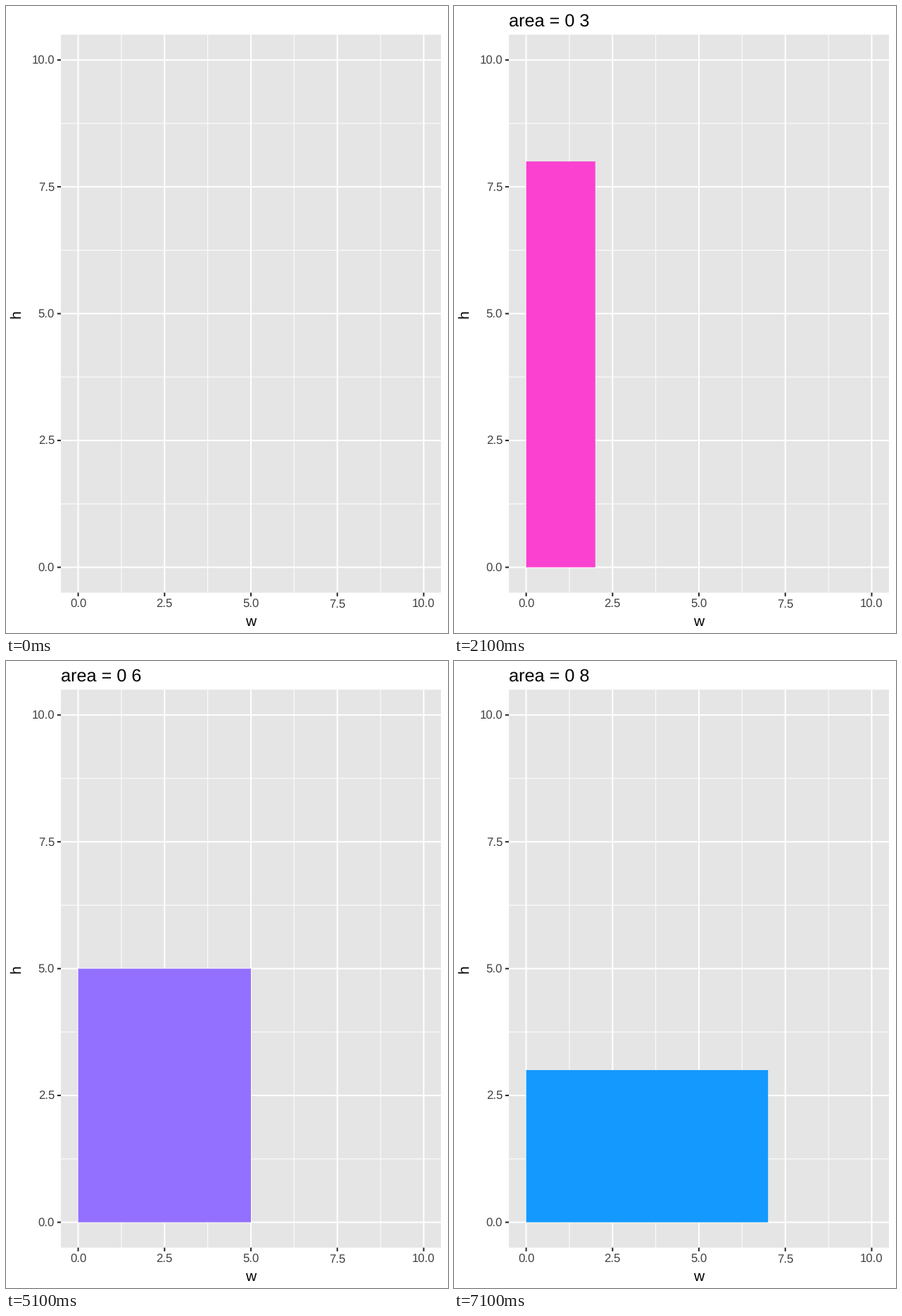
Animation, 628 px wide and 892 px high, one loop 8000 ms. Source, as a matplotlib script:

```python
import matplotlib.pyplot as plt
from matplotlib.animation import FuncAnimation
from matplotlib.patches import Rectangle

plt.rcParams["font.family"] = "Liberation Sans"
plt.rcParams["text.hinting"] = "none"

W, H, DPI = 628, 892, 100
LEFT, RIGHT, TOP, BOTTOM = 78, 618, 40.7, 834.6
PT = 72 / DPI  # points per pixel
STEP_MS, LOOP_MS, FIRST_MS = 100, 8000, 100

# Fill colour for each bar width from 0 to 7
FILLS = ["#ff5a90", "#ff48b0", "#fa41cf", "#e349ea",
         "#c457ff", "#9370ff", "#5086ff", "#1499ff"]


def px(w):
    return LEFT + (w + 0.5) * (RIGHT - LEFT) / 11


def py(h):
    return BOTTOM - (h + 0.5) * (BOTTOM - TOP) / 11


fig = plt.figure(figsize=(W / DPI, H / DPI), dpi=DPI, facecolor="white")
ax = fig.add_axes([0, 0, 1, 1])
ax.set_xlim(0, W)
ax.set_ylim(H, 0)
ax.axis("off")


def line(xs, ys, width, color, z):
    ax.plot(xs, ys, color=color, lw=width * PT, zorder=z,
            solid_capstyle="butt", snap=False)


def label(x, y, text, size, color="black", ha="center", **kw):
    return ax.text(x, y, text, fontsize=size * PT, color=color, ha=ha,
                   va="baseline", **kw)


def box(x, y, w, h, color, z):
    patch = Rectangle((x, y), w, h, fc=color, lw=0, zorder=z, snap=False)
    return ax.add_patch(patch)


def grid(v, width, z):
    line([px(v)] * 2, [TOP, BOTTOM], width, "white", z)
    line([LEFT, RIGHT], [py(v)] * 2, width, "white", z)


box(LEFT, TOP, RIGHT - LEFT, BOTTOM - TOP, "#e5e5e5", 0)
for i in range(4):
    grid(1.25 + 2.5 * i, 1.02, 1)
for i in range(5):
    v = 2.5 * i
    grid(v, 2.04, 2)
    line([px(v)] * 2, [BOTTOM, BOTTOM + 5.2], 2.04, "#272727", 2)
    line([LEFT - 5.2, LEFT], [py(v)] * 2, 2.04, "#272727", 2)
    label(px(v), 856, f"{v:.1f}", 16.8, "#404040")
    label(69, py(v) + 6, f"{v:.1f}", 16.8, "#404040", ha="right")

label(348, 881.5, "w", 21)
label(25, 437.7, "h", 21, ha="right", rotation=90).set(
    va="center", rotation_mode="default")
title = label(78, 28.5, "", 25.2, ha="left")
bar = box(px(0), py(0), 0, 0, FILLS[0], 3)


def draw(frame):
    # The bar trades one unit of height for one of width each second
    t = frame * STEP_MS - FIRST_MS
    w = max(t // 1000, 0)
    h = 10 - w
    title.set_text(f"area = 0 {w + 1}" if t >= 0 else "")
    bar.set_bounds(px(0), py(h), px(w) - px(0), py(0) - py(h))
    bar.set_facecolor(FILLS[w])
    bar.set_visible(w > 0)
    return title, bar


anim = FuncAnimation(fig, draw, frames=LOOP_MS // STEP_MS, interval=STEP_MS,
                     repeat=True, repeat_delay=0, blit=False)
plt.show()
```
